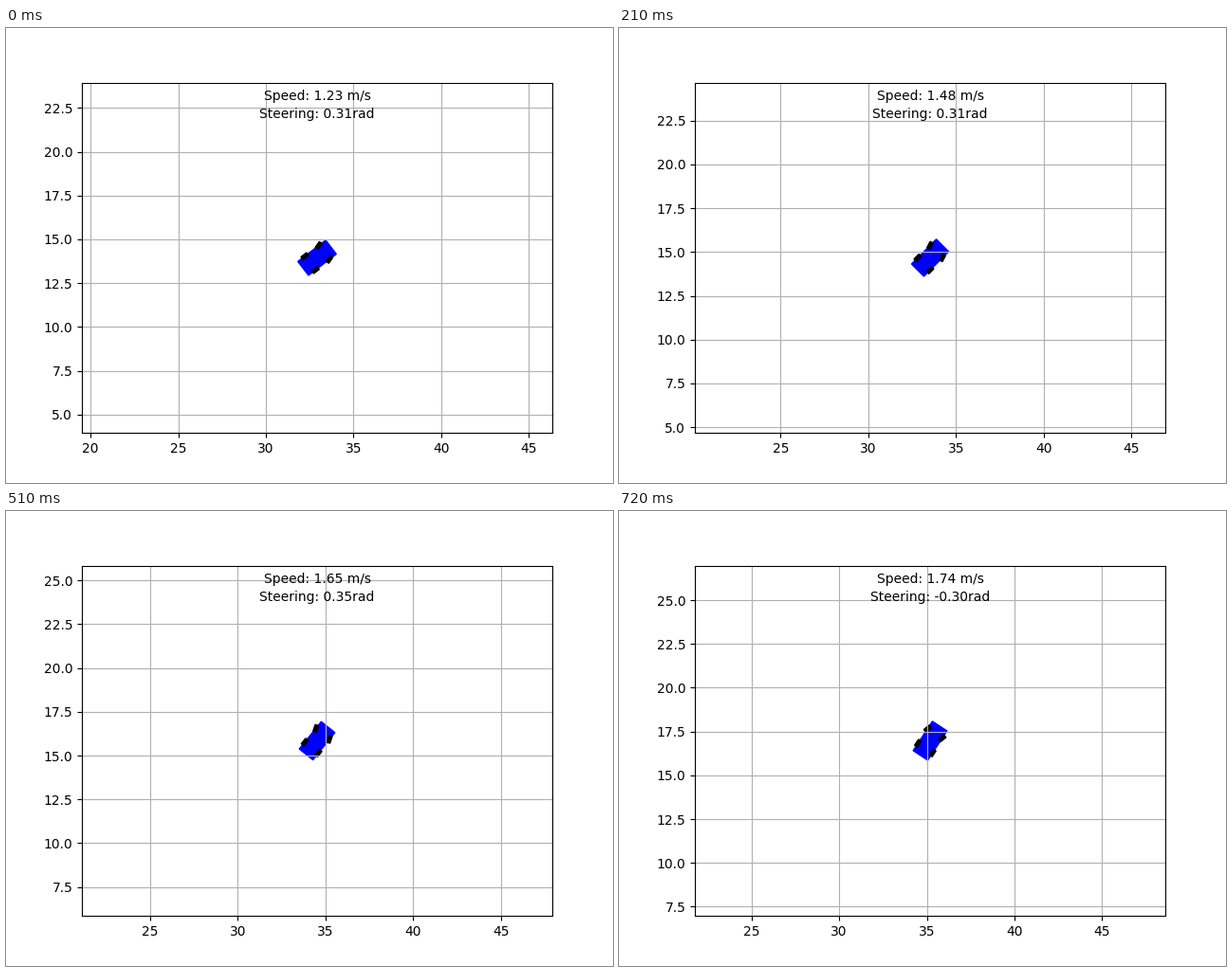
A matplotlib script for the animation above (0.75 s loop, 640 px wide and 480 px high).

```python
import numpy as np
import matplotlib.pyplot as plt
from matplotlib.animation import FuncAnimation
from matplotlib.patches import Polygon
from matplotlib.ticker import MultipleLocator

FRAMES = 25
INTERVAL = 30
HALF_H = 10
HALF_W = HALF_H * 496 / 369.6
WHEELBASE = 2.3
WEAVES = (9, 20)     # steps where the car stops turning and runs straight
WEAVE_LEN = 5

# Key points of the drive: step, x, y, speed
KEYS = [
    (0, 32.92, 13.945, 1.23),
    (5, 33.355, 14.46, 1.44),
    (9, 33.695, 14.885, 1.52),
    (13, 34.13, 15.325, 1.63),
    (17, 34.52, 15.845, 1.65),
    (20, 34.763, 16.345, 2.02),
    (24, 35.185, 16.973, 1.74),
]


def steer_at(n):
    """Steer left, but flick right on every other step of a weave."""
    for start in WEAVES:
        if 0 <= n - start < WEAVE_LEN and (n - start) % 2 == 0:
            return -min(0.30, 0.22 + 0.04 * (n - WEAVES[0]))
    return 0.31 if n < WEAVES[0] else 0.35


def rotate(points, angle):
    c, s = np.cos(angle), np.sin(angle)
    return np.asarray(points) @ np.array([[c, s], [-s, c]])


def box(length, width):
    return np.array([(-1, -1), (1, -1), (1, 1), (-1, 1)]) * (length / 2, width / 2)


key_step, *key_values = np.transpose(KEYS)
xs, ys, speed = (np.interp(np.arange(FRAMES), key_step, v) for v in key_values)
steer = np.array([steer_at(n) for n in range(FRAMES)])

# Bicycle model: the heading turns with distance and steering angle
dist = np.hypot(np.diff(xs), np.diff(ys))
turn = dist * np.tan(steer[:-1]) / WHEELBASE
heading = 0.654 + np.concatenate([[0], np.cumsum(turn)])

BODY = box(2.0, 1.0)
WHEEL = box(0.4, 0.2)
MOUNTS = [(a, b) for a in (-0.5, 0.5) for b in (-0.5, 0.5)]

fig, ax = plt.subplots(figsize=(6.4, 4.8), dpi=100)
ax.grid(True)
ax.xaxis.set_major_locator(MultipleLocator(5))
ax.yaxis.set_major_locator(MultipleLocator(2.5))

# Patches stay below the grid lines
body = ax.add_patch(Polygon(BODY, color="blue", lw=1))
wheels = [ax.add_patch(Polygon(WHEEL, color="black", lw=1)) for _ in MOUNTS]
speed_text = ax.text(0, 0, "", ha="center")
steer_text = ax.text(0, 0, "", ha="center")


def update(i):
    x, y, yaw = xs[i], ys[i], heading[i]
    pos = np.array([x, y])
    ax.set_xlim(x - HALF_W, x + HALF_W)
    ax.set_ylim(y - HALF_H, y + HALF_H)

    body.set_xy(rotate(BODY, yaw) + pos)
    for wheel, mount in zip(wheels, MOUNTS):
        angle = steer[i] if mount[0] > 0 else 0
        wheel.set_xy(rotate(rotate(WHEEL, angle) + mount, yaw) + pos)

    # The tiny shift keeps the centred text on the same pixel in every frame
    speed_text.set_position((x + 0.002, y + 9))
    speed_text.set_text(f"Speed: {speed[i]:.2f} m/s")
    steer_text.set_position((x + 0.002, y + 8))
    steer_text.set_text(f"Steering: {steer[i]:.2f}rad")
    return [body, *wheels, speed_text, steer_text]


anim = FuncAnimation(fig, update, frames=FRAMES, interval=INTERVAL,
                     repeat=True, repeat_delay=0)
plt.show()
```
